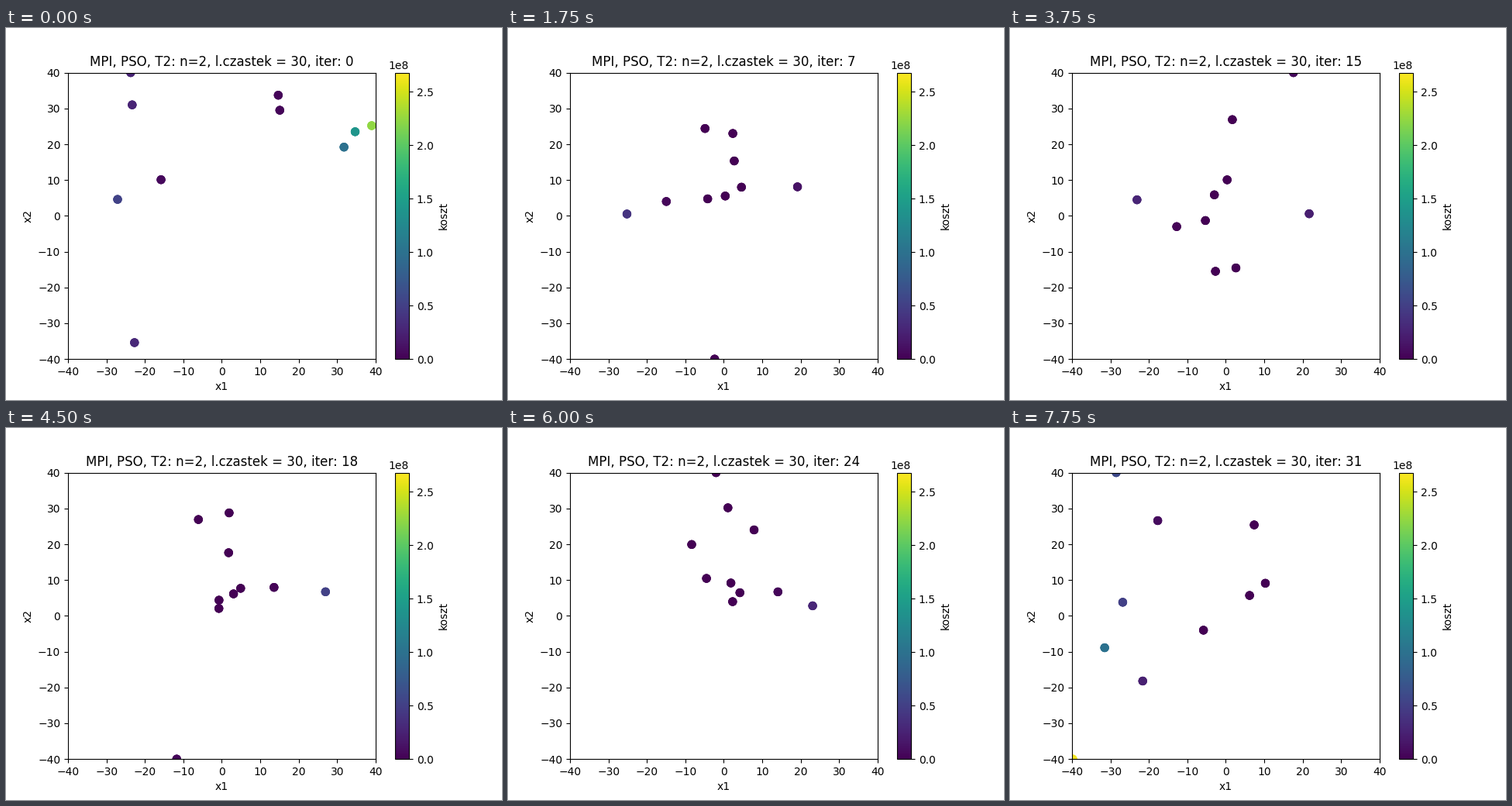
Write a matplotlib script that moves like this. It is 640 px wide and 480 px high and loops after 8000 ms.

```python
import numpy as np
import matplotlib.pyplot as plt
from matplotlib.animation import FuncAnimation

ITERS = 32
LIMIT = 40
COPIES = 3  # ten positions, each shared by three of the 30 particles
BEST = np.array([0, 6])  # spot the swarm circles around

# Key poses of the swarm at the first and last iteration
START = np.array([(-23.7, 40), (-23.3, 31), (-22.7, -35.4), (-27.1, 4.6), (-15.8, 10.1),
                  (14.7, 33.7), (15.1, 29.5), (31.8, 19.2), (34.7, 23.5), (39, 25.2)])
END = np.array([(-28.5, 40), (-26.8, 3.8), (-31.5, -8.9), (-39.8, -40), (-21.6, -18.2),
                (-17.7, 26.6), (-5.8, -4), (7.4, 25.4), (6.2, 5.7), (10.3, 9.1)])


def swarm_history():
    """Particles leave START, swing around BEST and scatter into END."""
    rng = np.random.default_rng(5)
    t = np.arange(ITERS)[:, None, None]
    u = t / (ITERS - 1)
    pull = np.sin(np.pi * u).clip(0) ** 0.4
    reach = rng.laplace(0, (15, 10), START.shape)
    speed = rng.uniform(0.5, 1.2, START.shape)
    phase = rng.uniform(0, 2 * np.pi, START.shape)
    swing = BEST + reach * np.cos(speed * t + phase)
    drift = START + (END - START) * u
    return np.clip(drift + (swing - drift) * pull, -LIMIT, LIMIT)


def cost(p):
    x1, x2 = p.T
    return 100 * (x2 - x1**2) ** 2 + (1 - x1) ** 2


history = swarm_history()

fig, ax = plt.subplots(figsize=(6.4, 4.8), dpi=100)
first = np.tile(history[0], (COPIES, 1))
dots = ax.scatter(*first.T, s=50, c=cost(first), cmap="viridis", vmin=0, vmax=2.68e8)
fig.colorbar(dots, ax=ax, label="koszt")
ax.set(xlim=(-LIMIT, LIMIT), ylim=(-LIMIT, LIMIT), xlabel="x1", ylabel="x2")
title = ax.set_title("")


def update(i):
    points = np.tile(history[i], (COPIES, 1))
    dots.set_offsets(points)
    dots.set_array(cost(points))
    title.set_text(f"MPI, PSO, T2: n=2, l.czastek = 30, iter: {i}")
    return dots, title


anim = FuncAnimation(fig, update, frames=ITERS, interval=250, repeat=True, repeat_delay=0)
plt.show()
```
